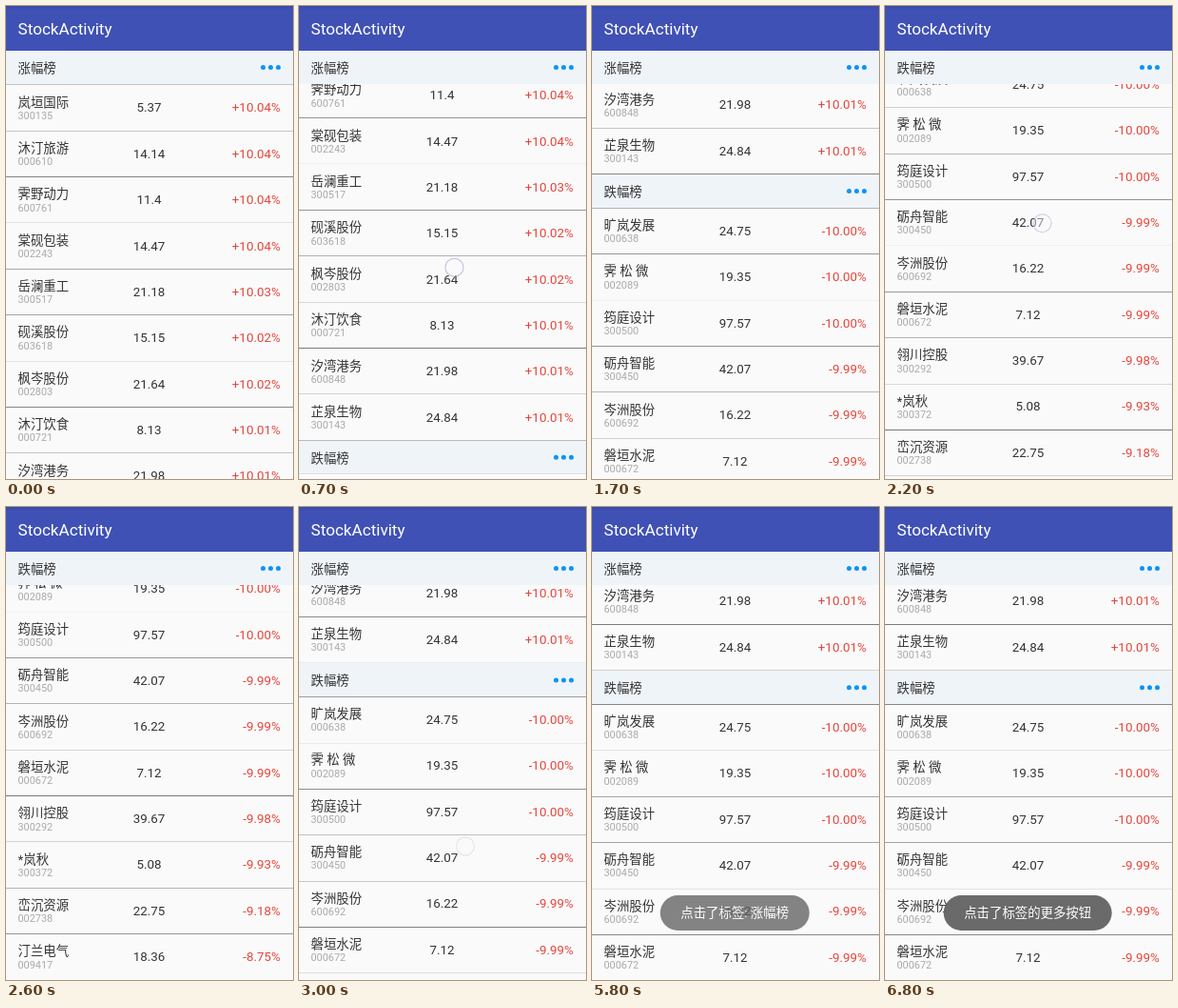
Animation of 302x497 px, one loop 7.8 s. Source, as an HTML page:

```html
<!DOCTYPE html>
<html lang="zh-CN">
<head>
<meta charset="utf-8">
<title>StockActivity</title>
<style>
html, body { margin: 0; width: 100%; height: 100%; overflow: hidden; background: #fafafa; }
body { position: relative; color: #333; font: 13.4px/16px Roboto, "Noto Sans CJK SC", "Noto Sans CJK", sans-serif; }
div, span { position: absolute; white-space: pre; }
#list, .row, .header, .line, #bar { left: 0; width: 302px; }
#list { top: 0; }
.row { height: 48px; }
.name { left: 12.5px; top: 10.8px; }
.code { left: 12.5px; top: 25px; font-size: 10.9px; color: #aaa; }
.price { left: 100.5px; width: 100px; top: 16.6px; text-align: center; }
.change { right: 13.2px; top: 16.6px; color: #e5463c; }
.header { height: 35.7px; background: #eff4f9; }
.header .title { left: 12.5px; top: 11px; }
.dot { top: 15.4px; width: 5px; height: 5px; border-radius: 50%; background: #0a94f5; }
.line { height: 1px; background: #777; }
#sticky { top: 47px; height: 35px; }
#bar { top: 0; height: 47px; background: linear-gradient(#3a4aa6, #3f51b5 4px); }
#bar span { left: 12.6px; top: 12px; color: #fff; font-size: 17.1px; line-height: 24px; }
.toast { left: 150.2px; top: 408px; height: 37px; padding: 0 21.4px; border-radius: 18.5px; transform: translateX(-50%);
  background: rgba(98, 98, 98, .95); color: #fff; line-height: 37.4px; }
#touch { left: -10px; top: -10px; width: 20px; height: 20px; box-sizing: border-box; border-radius: 50%;
  border: 1.5px solid rgba(150, 140, 205, .6); background: rgba(250, 250, 253, .6); }
</style>
</head>
<body>
<div id="list"></div>
<div id="lines"></div>
<div id="sticky" class="header"></div>
<div id="bar"><span>StockActivity</span></div>
<div id="touch"></div>
<script>
const LOOP = 7800, STEP = 100;
const ROW = 48.375, ROWS = 10, HEADER = 35.7, BAR = 47;
const GAIN_TOP = 82.81, LOSS_HEADER = GAIN_TOP + ROWS * ROW, LOSS_TOP = LOSS_HEADER + HEADER;
const MAX_SCROLL = LOSS_TOP + ROWS * ROW - 497;
const TITLES = ["涨幅榜", "跌幅榜"];

const gainers = `岚垣国际|300135|5.37|+10.04%
沐汀旅游|000610|14.14|+10.04%
霁野动力|600761|11.4|+10.04%
棠砚包装|002243|14.47|+10.04%
岳澜重工|300517|21.18|+10.03%
砚溪股份|603618|15.15|+10.02%
枫岑股份|002803|21.64|+10.02%
沐汀饮食|000721|8.13|+10.01%
汐湾港务|600848|21.98|+10.01%
芷泉生物|300143|24.84|+10.01%`;
const losers = `旷岚发展|000638|24.75|-10.00%
霁 松 微|002089|19.35|-10.00%
筠庭设计|300500|97.57|-10.00%
砺舟智能|300450|42.07|-9.99%
岑洲股份|600692|16.22|-9.99%
磐垣水泥|000672|7.12|-9.99%
翎川控股|300292|39.67|-9.98%
*岚秋|300372|5.08|-9.93%
峦沉资源|002738|22.75|-9.18%
汀兰电气|009417|18.36|-8.75%`;

// Each swipe carries the scroll on to its own end, with the finger starting at x, y
const swipes = [
  { start: 460, length: 540, to: 183.9, x: 163.5, y: 385 },
  { start: 1200, length: 500, to: 390, x: 163.5, y: 385 },
  { start: 1900, length: 535, to: MAX_SCROLL, x: 165.5, y: 382 },
  { start: 2660, length: 442, to: 394.7, x: 175, y: 170 }];
const taps = [{ start: 3500, x: 124, y: 76 }, { start: 5900, x: 279, y: 68 }];
const TAP_LENGTH = 600, TAP_FADE = 500;

const clamp = v => Math.min(1, Math.max(0, v));
const ramp = (t, start, length) => clamp((t - start) / length);
const fling = p => 1 - (1 - p) ** 3 * (1 + 3 * p);

function add(parent, className, text = "", style = {}) {
  const el = document.createElement("div");
  el.className = className;
  el.textContent = text;
  Object.assign(el.style, style);
  return parent.appendChild(el);
}

const [list, lineLayer, sticky, touch] =
  ["list", "lines", "sticky", "touch"].map(id => document.getElementById(id));

function fillHeader(el, text) {
  for (let i = 0; i < 3; i++) add(el, "dot", "", { left: 268.2 + 7.8 * i + "px" });
  return add(el, "title", text);
}

function addRows(records, top) {
  records.split("\n").forEach((record, i) => {
    const row = add(list, "row", "", { top: top + i * ROW + "px" });
    const cells = record.split("|");
    ["name", "code", "price", "change"].forEach((kind, k) => add(row, kind, cells[k]));
  });
}

addRows(gainers, GAIN_TOP);
addRows(losers, LOSS_TOP);
fillHeader(add(list, "header", "", { top: LOSS_HEADER + "px" }), TITLES[1]);
const stickyTitle = fillHeader(sticky, TITLES[0]);
const lines = [GAIN_TOP, LOSS_TOP].flatMap(top =>
  Array.from({ length: ROWS + 1 }, (_, i) => ({ y: top + i * ROW, el: add(lineLayer, "line") })));
const toasts = [
  { el: add(document.body, "toast", "点击了标签: 涨幅榜"), shown: 3600, hidden: 5700 },
  { el: add(document.body, "toast", "点击了标签的更多按钮"), shown: 6200, hidden: LOOP }];

function placeTouch(x, y, alpha) {
  touch.style.transform = `translate(${x}px, ${y}px)`;
  touch.style.opacity = clamp(alpha);
}

function scrollAt(t) {
  let scroll = 0;
  for (const { start, length, to, x, y } of swipes) {
    if (t < start) break;
    const p = ramp(t, start, length), moved = (to - scroll) * fling(p);
    placeTouch(x, y - moved, 1.7 * (1 - p));
    scroll += moved;
  }
  return scroll;
}

function drawLines(scroll) {
  // Hairlines fade as they drift off the centre of a pixel row
  for (const { y, el } of lines) {
    const pos = y - scroll, px = Math.floor(pos);
    el.style.top = px + "px";
    el.style.opacity = px < 82 ? 0 : clamp(1 - 1.9 * Math.abs(pos - px - .5));
  }
}

function render(t) {
  placeTouch(0, 0, 0);
  const scroll = scrollAt(t);
  list.style.transform = `translateY(${-scroll}px)`;
  drawLines(scroll);

  const headerY = LOSS_HEADER - scroll, swapped = headerY <= BAR;
  stickyTitle.textContent = TITLES[+swapped];
  sticky.style.transform = `translateY(${swapped ? 0 : Math.min(0, headerY - BAR - HEADER)}px)`;

  for (const { start, x, y } of taps)
    if (t >= start && t < start + TAP_LENGTH) placeTouch(x, y, (start + TAP_LENGTH - t) / TAP_FADE);

  for (const { el, shown, hidden } of toasts)
    el.style.opacity = ramp(t, shown, 600) - ramp(t, hidden, 550);
}

const start = performance.now();
function tick() {
  const t = (performance.now() - start) % LOOP;
  render(Math.floor(t / STEP) * STEP);
  requestAnimationFrame(tick);
}
tick();
</script>
</body>
</html>
```
